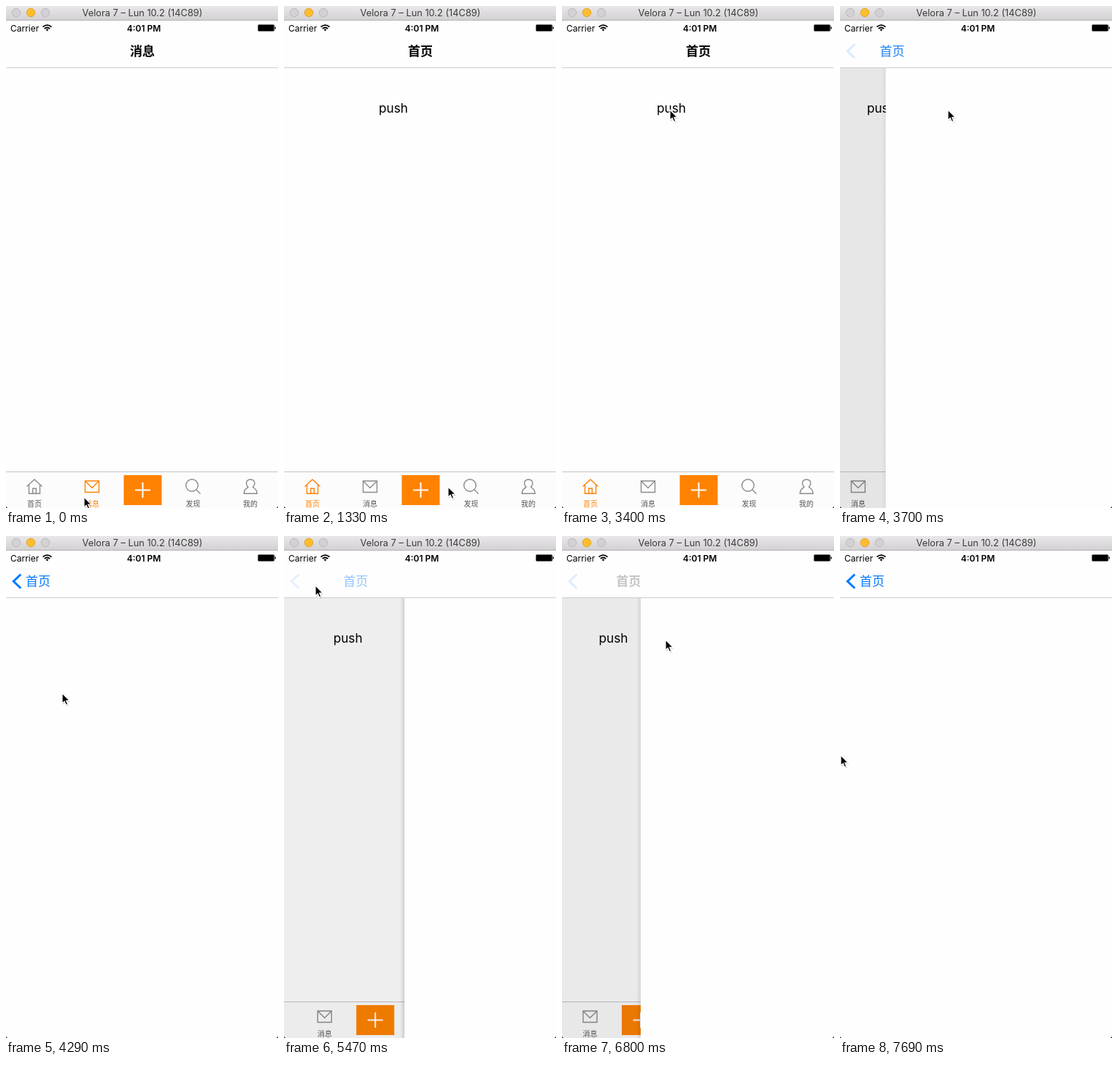
An HTML page that plays this animation: 373 px wide and 687 px high, repeating every 8000 ms.

```html
<!DOCTYPE html>
<html lang="zh-CN">
<head>
<meta charset="utf-8">
<title>Tab bar navigation</title>
<style>
  html, body { margin: 0; width: 100%; height: 100%; overflow: hidden; background: #111; }
  svg { display: block; position: absolute; left: 0; top: 0; width: 373px; height: 687px; border-radius: 0 0 4px 4px; }
  text { font-family: "Noto Sans CJK SC", "Noto Sans CJK", sans-serif; }
  .ui { font-family: Inter, Roboto, sans-serif; }
  .nav { font-size: 17px; }
  .bold { font-weight: 700; }
  .mid { text-anchor: middle; }
  .tab { color: #8c8c8c; }
  .tab text { font-size: 10px; text-anchor: middle; fill: #555; }
  .tab path, .tab circle { fill: none; stroke: currentColor; stroke-width: 1.4; }
  .tab.on { color: #ff8200; }
  .tab.on text { fill: #ff8200; }
</style>
</head>
<body>
<svg viewBox="0 0 373 687">
  <defs>
    <linearGradient id="chrome" x2="0" y2="1">
      <stop offset="0" stop-color="#e9e7e9"/>
      <stop offset="1" stop-color="#d1cfd1"/>
    </linearGradient>
    <linearGradient id="fade">
      <stop offset="0" stop-opacity="0"/>
      <stop offset="1" stop-opacity=".14"/>
    </linearGradient>
  </defs>
  <rect width="373" height="687" fill="#fefefe"/>

  <g id="home">
    <text id="push" class="ui" x="130" y="146" font-size="17.2">push</text>
    <rect y="637" width="373" height="50" fill="#fcfcfc"/>
    <rect y="637" width="373" height="1" fill="#c4c4c4"/>
    <g class="tab" id="tabHome">
      <path d="M28.5 657.5L39 648L49.5 657.5M31.5 655.5V667.2H46.5V655.5M36.7 667V660.2H41.3V667"/>
      <text x="39" y="684.8">首页</text>
    </g>
    <g class="tab" id="tabMail">
      <path d="M108.5 650H127.5V665.5H108.500ZM109 650.500L118 659.500L127 650.500"/>
      <text x="118" y="684.8">消息</text>
    </g>
    <rect x="161.5" y="642" width="52" height="41" fill="#ff8200"/>
    <path d="M177 662.5H198M187.5 652V673" stroke="#fff" stroke-width="2"/>
    <g class="tab">
      <circle cx="255" cy="656" r="8.3"/>
      <path d="M261 662L266.5 667.5"/>
      <text x="256.5" y="684.8">发现</text>
    </g>
    <g class="tab">
      <path d="M332 658.5C327.5 653 330 648 335.3 648S343 653 338.6 658.5C341.5 660.5 344 662 344.3 667.2H326.3C326.6 662 329 660.5 332 658.5Z"/>
      <text x="335" y="684.8">我的</text>
    </g>
  </g>

  <rect id="dim" y="85" width="373" height="602"/>
  <g id="panel">
    <rect id="shadow" x="-6" y="85" width="6" height="602" fill="url(#fade)"/>
    <rect y="85" width="373" height="602" fill="#fefefe"/>
  </g>

  <rect y="20" width="373" height="64" fill="#fefefe"/>
  <rect y="84" width="373" height="1" fill="#cecece"/>
  <text id="title" class="nav bold" y="68.4">消息</text>
  <text id="back" class="nav" y="68.4" fill="#007aff">首页</text>
  <path id="chevron" d="M20.3 52.5L10.3 62L20.3 71.5" fill="none" stroke="#007aff" stroke-width="3"/>

  <text class="ui" x="6" y="34.5" font-size="12">Carrier</text>
  <g fill="none" stroke="#000" stroke-width="1.8">
    <path d="M50.5 28.6Q56.5 23.6 62.5 28.6M52.8 31Q56.5 27.9 60.2 31"/>
    <path d="M54.6 32.2Q56.5 30.8 58.4 32.2L56.5 34.5Z" fill="#000" stroke="none"/>
  </g>
  <text class="ui mid" x="189" y="34.5" font-size="12" font-weight="600">4:01 PM</text>
  <rect x="345.5" y="25.5" width="22.5" height="9" rx="1.5" fill="none" stroke="#777"/>
  <rect x="346" y="26" width="21.5" height="8"/>
  <path d="M368.5 28V32Q370 31.5 370 30T368.5 28Z"/>

  <rect width="373" height="20" fill="url(#chrome)"/>
  <rect y="19" width="373" height="1" fill="#b5b3b5"/>
  <g fill="#d3d1d3" stroke="#bcbabc">
    <circle cx="14" cy="9" r="5.7"/>
    <circle cx="34" cy="9" r="5.7" fill="#ffbd2e" stroke="#e0a32a"/>
    <circle cx="54" cy="9" r="5.7"/>
  </g>
  <text class="ui mid" x="187" y="14" font-size="12.8" fill="#3c3c3c">Velora 7 – Lun 10.2 (14C89)</text>

  <g id="cursor">
    <path d="M1 1.5V16L4.2 13L6.4 18L9 17L6.9 12H11.4Z" opacity=".18"/>
    <path d="M0 0V14.3L3.2 11.3L5.4 16.4L7.8 15.4L5.7 10.4H10.2Z" stroke="#fff" stroke-width="1.2"/>
  </g>
</svg>
<script>
const LOOP = 8000, STEP = 147.9, LAST = 52, W = 373;
const PUSHES = [3521, 6667], POP = 5390, TAB_STEP = 4;

// step, x, y of the pointer tip
const PATH = [
  [0, 107, 672], [1, 72, 670], [2, 47, 666], [5, 47, 666], [7, 110, 660],
  [9, 225, 658], [11, 191, 655], [13, 199, 657], [14, 199, 657], [15, 198, 665],
  [16, 188, 540], [17, 168, 350], [18, 157, 236], [20, 149, 160], [22, 148, 142],
  [26, 148, 142], [29, 77, 215], [30, 75, 244], [32, 24, 66], [33, 24, 66],
  [35, 43, 67], [38, 43, 68], [41, 108, 128], [44, 142, 142], [47, 142, 142],
  [49, 2, 301], [50, 1, 300]
];

const el = id => document.getElementById(id);
const clamp = v => Math.max(0, Math.min(1, v));
const move = (node, x, y = 0) => node.setAttribute("transform", `translate(${x} ${y})`);
const [home, push, tabHome, tabMail, dim, panel, shadow, title, back, chevron, cursor] =
  ["home", "push", "tabHome", "tabMail", "dim", "panel", "shadow", "title", "back", "chevron", "cursor"].map(el);

// critically damped spring, settled after half a second
function spring(ms) {
  if (ms <= 0) return 0;
  if (ms >= 500) return 1;
  const a = ms * 0.01826;
  return 1 - (1 + a) * Math.exp(-a);
}

function pointer(step) {
  const n = PATH.findIndex(k => k[0] > step);
  if (n < 0) return PATH[PATH.length - 1].slice(1);
  const [s, x, y] = PATH[n - 1], [s2, x2, y2] = PATH[n];
  const u = (step - s) / (s2 - s);
  return [x + (x2 - x) * u, y + (y2 - y) * u];
}

function render(time) {
  // the screen refreshes only once per step
  const step = Math.min(LAST, Math.floor((time + 8) / STEP));
  const t = step * STEP;
  const p = spring(t - PUSHES[0]) - spring(t - POP) + spring(t - PUSHES[1]);
  const rest = 1 - p;
  const popping = t > POP && t < PUSHES[1];
  const atHome = step >= TAB_STEP;

  tabHome.classList.toggle("on", atHome);
  tabMail.classList.toggle("on", !atHome);
  push.style.opacity = +atHome;
  title.textContent = atHome ? "首页" : "消息";

  move(home, -0.3 * W * p);
  move(panel, W * rest);
  dim.style.opacity = 0.11 * p;
  shadow.style.opacity = p > 0 ? clamp(2.2 * rest) : 0;

  const x = 27 + (popping ? 143 * Math.pow(clamp(rest), 1.19) : Math.min(143, 163 * rest));
  title.setAttribute("x", x);
  back.setAttribute("x", x);
  title.style.opacity = clamp(popping ? 1 - 2 * p : 1 - 1.1 * p);
  back.style.opacity = clamp(popping ? (p - 0.3) / 0.6 : (p - 0.71) * 7);
  chevron.style.opacity = p > 0.85 ? clamp(0.15 + (p - 0.85) * 5.7) : 0.18 * p;

  move(cursor, ...pointer(step));
}

function frame(now) {
  render(now % LOOP);
  requestAnimationFrame(frame);
}
render(0);
requestAnimationFrame(frame);
</script>
</body>
</html>
```
